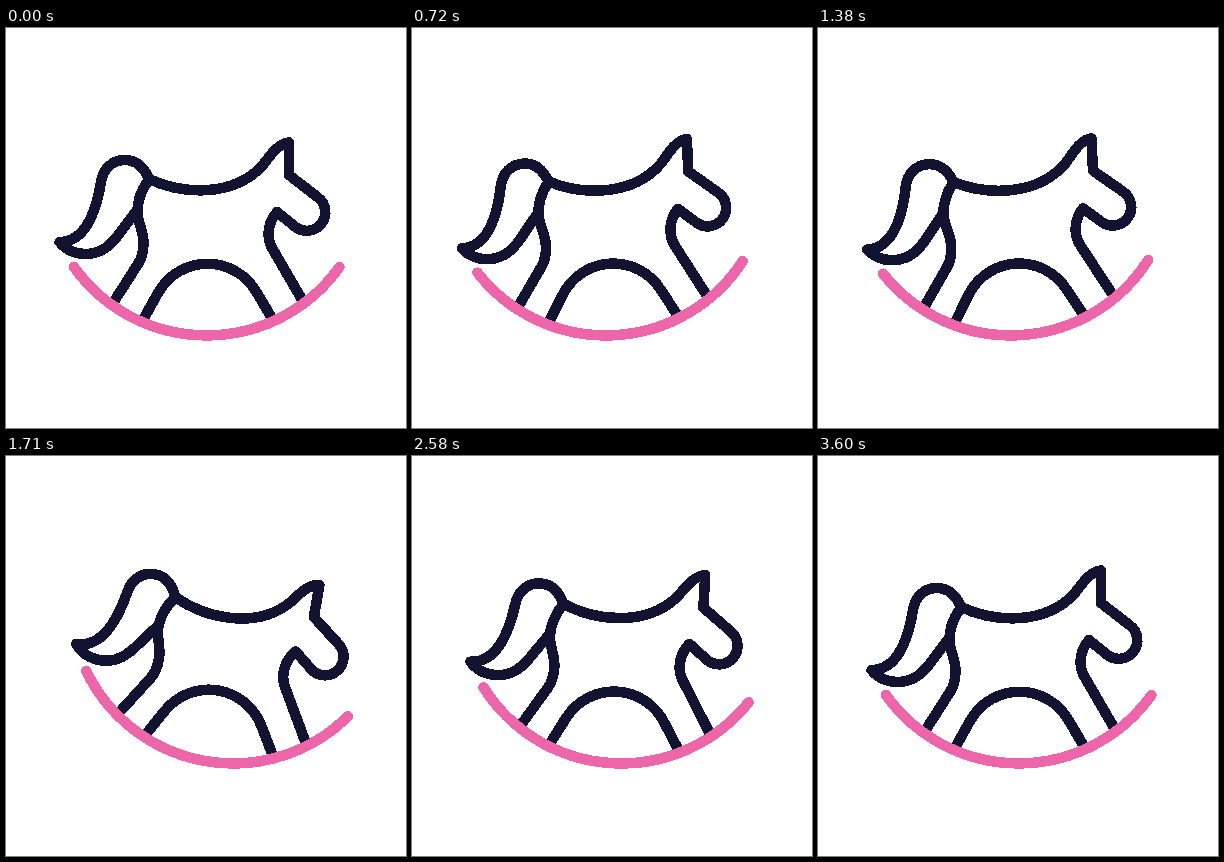
These frames come from a looping animation (400 px wide and 400 px high, 3630 ms). An HTML page:

```html
<!DOCTYPE html>
<html lang="en">
<head>
<meta charset="utf-8">
<title>Rocking horse</title>
<style>
  html, body { margin: 0; width: 100%; height: 100%; overflow: hidden; background: #fff; }
  svg { display: block; width: 100vw; height: 100vh; }
  g { fill: none; stroke: #121331; stroke-width: 10.5; stroke-linejoin: round; shape-rendering: crispEdges; }
  .rocker { stroke: #ee66aa; stroke-linecap: round; }
</style>
</head>
<body>
<svg viewBox="0 0 400 400">
  <g id="horse">
    <!-- back, ear, head and front leg -->
    <path d="M143 151C175 166 226 170 256 138C262 131 271 115.500 283 114.500V147L312 169.500A18.500 18.500 0 0 1 289.500 199L271 184C262 194 260 209 266 220L298 275"/>
    <!-- belly -->
    <path d="M137 292L152 265C174 226 229 226 251 265L267 292"/>
    <!-- hind leg -->
    <path d="M143 151C134 164 131 176 131.500 185C132 195 137.500 203 137.500 215C137.500 223 136 230 132 236L107 275"/>
    <!-- tail -->
    <path d="M143 151C137 137 128 132 119 132C106 132 97 141 95 154C92 172 84 214 53.500 214C61 223 71 226 80 226C97 226 107 215 116 202L131 182"/>
    <path class="rocker" d="M68 239A163 163 0 0 0 333.500 239"/>
  </g>
</svg>
<script>
  const STEP = 30, STEPS = 121;
  const CENTER = { x: 200.5, y: 144 };
  const ROLL = 155; // horizontal travel per radian of tilt

  // [step, tilt in degrees] at each turning point
  const swings = [[0, 0], [16, 10], [34, -20], [56, 10], [72, -5.6], [89, 4], [107, -1], [120, 0]];
  const horse = document.getElementById('horse');
  const smooth = s => s * s * (3 - 2 * s);

  function tiltAt(step) {
    const i = Math.max(1, swings.findIndex(([end]) => end >= step));
    const [t0, a] = swings[i - 1], [t1, b] = swings[i];
    return a + (b - a) * smooth((step - t0) / (t1 - t0));
  }

  function draw(now) {
    const tilt = tiltAt(Math.floor(now / STEP) % STEPS);
    const shift = ROLL * tilt * Math.PI / 180;
    horse.setAttribute('transform', `translate(${shift} 0) rotate(${tilt} ${CENTER.x} ${CENTER.y})`);
  }

  let start;
  function tick(now) {
    start ??= now;
    draw(now - start);
    requestAnimationFrame(tick);
  }
  draw(0);
  requestAnimationFrame(tick);
</script>
</body>
</html>
```
